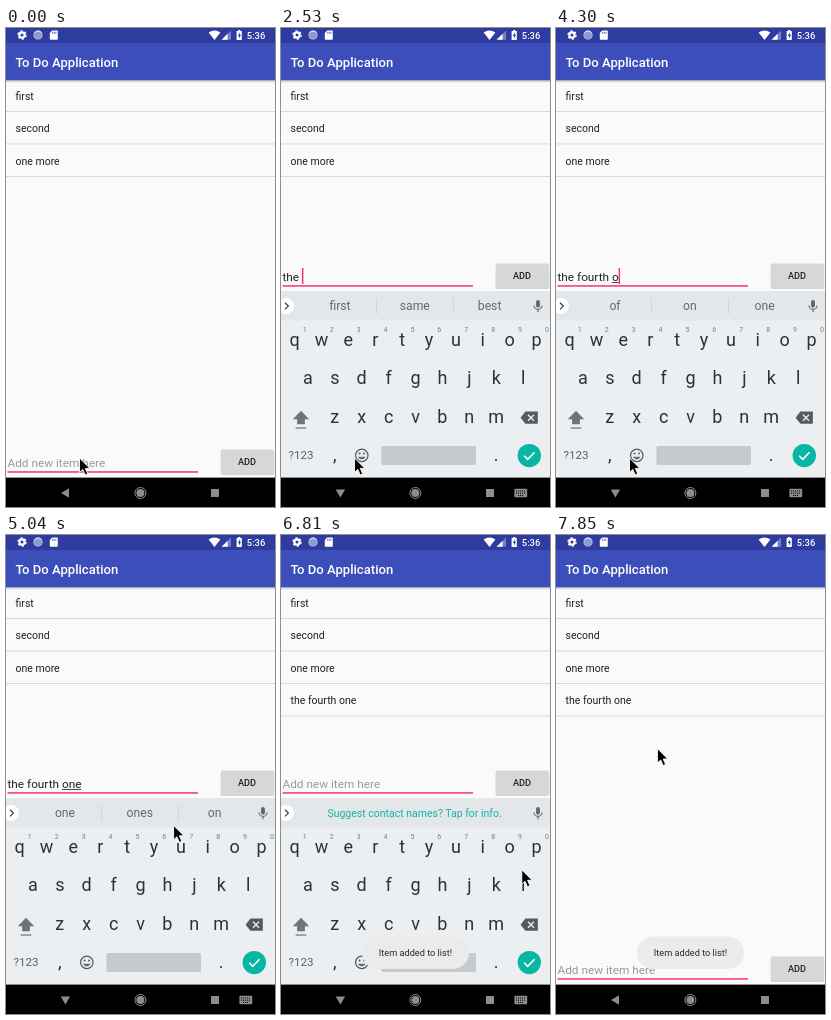
An HTML page for the animation above (8 s loop, 269 px wide and 479 px high).

```html
<!DOCTYPE html>
<html lang="en">
<head>
<meta charset="utf-8">
<title>To Do Application</title>
<style>
html, body { margin: 0; width: 100%; height: 100%; overflow: hidden; background: #fafafa; }
svg { display: block; width: 100vw; height: 100vh; font-family: Roboto, sans-serif; }
text { white-space: pre; }
.mid { text-anchor: middle; }
.med { font-weight: 500; }
</style>
</head>
<body>
<svg viewBox="0 0 269 479">
  <defs>
    <linearGradient id="shade" x1="0" y1="0" x2="0" y2="1">
      <stop offset="0" stop-color="#000" stop-opacity=".26"/>
      <stop offset="1" stop-color="#000" stop-opacity="0"/>
    </linearGradient>
  </defs>
  <rect width="269" height="479" fill="#fafafa"/>
  <g id="list" font-size="10.5" fill="#212121"></g>

  <rect y="52" width="269" height="3" fill="url(#shade)"/>
  <rect width="269" height="52.2" fill="#3c4eba"/>
  <rect width="269" height="15" fill="#2e3b9f"/>
  <text class="med" x="9.4" y="38.6" font-size="13.1" fill="#fff">To Do Application</text>

  <g id="status" fill="#fff">
    <circle cx="16" cy="7" r="2.6" fill="none" stroke="#fff" stroke-width="2.2"/>
    <circle cx="16" cy="7" r="4.1" fill="none" stroke="#fff" stroke-width="1.3" stroke-dasharray="2.15"/>
    <circle cx="32" cy="7" r="4.1" fill="#8e97d2" stroke="#b9bfe4" stroke-width=".9"/>
    <path d="M29 4.6a4.2 4.2 0 0 1 6.6 .2" fill="none" stroke="#e8eaf6"/>
    <path d="M46.2 2.4h4.9q.7 0 .7.7v8q0 .7-.7.7h-6.6q-.7 0-.7-.7V4.9z"/>
    <path d="M46.7 3.8v2M48.3 3.8v2M49.9 3.8v2" stroke="#2e3b9f" stroke-width=".7"/>
    <path d="M202.6 4.5q5.9-4.2 11.8 0l-5.9 7.4z"/>
    <path d="M225 2.4v9.4h-9.4z" opacity=".35"/>
    <path d="M221.6 5.8v6h-6z"/>
    <path d="M230.6 3.1h1.5v-1h2.2v1h1.5v8.8h-5.2z"/>
    <path d="M233.8 4.2l-2 3.7h1.2v2.7l2-3.8h-1.2z" fill="#2e3b9f"/>
    <text class="med" x="240.8" y="10.6" font-size="9.4">5:36</text>
  </g>

  <g id="bar">
    <text id="entry" x="1.5" y="438.6" font-size="11.8"></text>
    <rect id="under" y="440" height=".8" fill="#212121"/>
    <rect x="1.5" y="443.2" width="190.5" height="1.5" fill="#f5307f"/>
    <rect id="caret" y="426" width="1.5" height="16" fill="#f5307f"/>
    <rect x="214.6" y="422.4" width="53.6" height="24.6" rx="1.8" fill="#000" opacity=".16"/>
    <rect x="215" y="421.6" width="52.8" height="24.2" rx="1.4" fill="#d6d7d7"/>
    <rect id="press" x="215" y="421.6" width="52.8" height="24.2" rx="1.4" fill="#000"/>
    <text class="mid med" x="241" y="437.2" font-size="9.2" fill="#212121">ADD</text>
  </g>

  <g id="board">
    <rect y="263" width="269" height="190" fill="#eceff1"/>
    <rect y="263" width="269" height="29.5" fill="#e3e7ea"/>
    <circle cx="5" cy="278" r="8" fill="#fff"/>
    <path d="M4 274.8l3.3 3.3-3.3 3.3" fill="none" stroke="#37474f" stroke-width="1.3"/>
    <g id="words" class="mid" font-size="12.2" fill="#5f6b70">
      <path d="M95.5 270v16M172.5 270v16" stroke="#cbd0d3" stroke-width=".8"/>
      <text x="59" y="282.4"></text><text x="133.8" y="282.4"></text><text x="208.6" y="282.4"></text>
    </g>
    <text id="offer" class="mid" x="133.6" y="282" font-size="10.5" fill="#12b5a2">Suggest contact names? Tap for info.</text>
    <rect x="255.1" y="272" width="3.8" height="7.6" rx="1.9" fill="#5a666c"/>
    <path d="M253 277.4a4 4 0 0 0 8 0M257 281.4v2.8" fill="none" stroke="#5a666c" stroke-width="1.1"/>
    <g id="keys" class="mid" font-size="18" fill="#27343a"></g>
    <g fill="#69767c">
      <path d="M20 382.8l8.2 8.4h-4.3v5h-7.8v-5h-4.3z"/>
      <rect x="14.6" y="399.4" width="10.8" height="1.2"/>
    </g>
    <path d="M239.6 389.7l4.8-6.1h12.4v12.2h-12.4z" fill="#4f5c62"/>
    <path d="M247 386.7l6 6M253 386.7l-6 6" stroke="#eceff1" stroke-width="1.4"/>
    <text class="mid" x="20" y="431.4" font-size="11.6" fill="#566369">?123</text>
    <g fill="none" stroke="#4f5c62" stroke-width="1.2">
      <circle cx="80.8" cy="427.4" r="6.2"/>
      <path d="M77.4 429.2q3.4 3.6 6.8 0z" fill="#4f5c62" stroke-width=".6"/>
    </g>
    <circle cx="78.6" cy="425.6" r="1" fill="#4f5c62"/>
    <circle cx="83" cy="425.6" r="1" fill="#4f5c62"/>
    <rect x="100.4" y="418" width="94.6" height="19" rx="1.4" fill="#c5cacd"/>
    <circle cx="248.3" cy="427.6" r="11.7" fill="#08b7a3"/>
    <path d="M243.2 427.8l3.5 3.5 6.9-7" fill="none" stroke="#fff" stroke-width="1.6"/>
  </g>

  <rect y="449.6" width="269" height="30" fill="#000"/>
  <g fill="#8d8d8d">
    <path id="back" d="M55 465l8-4.7v9.4z"/>
    <circle cx="134.4" cy="465" r="5.5" fill="none" stroke="#8d8d8d" stroke-width="1"/>
    <circle cx="134.4" cy="465" r="4"/>
    <rect x="205" y="461" width="8" height="8"/>
    <g id="ime">
      <rect x="233.4" y="460.8" width="12.8" height="8.4" rx="1"/>
      <path d="M235 463h10M235 465.2h10M237 467.5h6" stroke="#000" stroke-width="1" stroke-dasharray="1.1 .9"/>
    </g>
  </g>

  <g id="toast">
    <rect x="81" y="401.6" width="107" height="32.4" rx="16.2" fill="#ebebeb"/>
    <text class="mid" x="134.5" y="421" font-size="9.2" fill="#2a2a2a">Item added to list!</text>
  </g>

  <path id="mouse" d="M0 0V14.4L3.3 11.4L5.7 16.9L8.2 15.8L5.8 10.4H10.4Z" fill="#000" stroke="#fff" stroke-width=".9"/>
</svg>
<script>
const LOOP = 8000;
const $ = id => document.getElementById(id);
const set = (el, attrs) => { for (const k in attrs) el.setAttribute(k, attrs[k]); };
const show = (el, on) => el.setAttribute('visibility', on ? 'visible' : 'hidden');

function add(parent, tag, attrs, label) {
  const el = document.createElementNS('http://www.w3.org/2000/svg', tag);
  set(el, attrs);
  if (label) el.textContent = label;
  parent.appendChild(el);
  return el;
}

// List rows and their dividers
const rows = ['first', 'second', 'one more', 'the fourth one'].map((label, i) => {
  const g = add($('list'), 'g', {});
  add(g, 'text', { x: 9.5, y: 71.7 + i * 32.4 }, label);
  add(g, 'rect', { y: 83 + i * 32.5, width: 269, height: .9, fill: '#d5d5d5' });
  return g;
});

// Letter keys
const PITCH = 26.9;
[['qwertyuiop', 13.5, 317.6], ['asdfghjkl', 26.9, 356], ['zxcvbnm', 53.8, 395]].forEach(([letters, x0, y], r) => {
  [...letters].forEach((c, i) => {
    const x = x0 + i * PITCH;
    add($('keys'), 'text', { x, y }, c);
    if (!r) add($('keys'), 'text', { x: x + 10.3, y: 303.8, 'font-size': 7, fill: '#718087' }, String((i + 1) % 10));
  });
});
add($('keys'), 'text', { x: 53.8, y: 433.4 }, ',');
add($('keys'), 'text', { x: 215, y: 433.4 }, '.');

const span = (a, b, n) => Array.from({ length: n }, (_, i) => Math.round((a + (b - a) * i / (n - 1)) / 10) * 10);
const ticks = [0, 300, 750, 1190, 1790, ...span(2240, 2530, 3), ...span(3120, 3420, 3),
  ...span(3860, 4590, 6), ...span(5040, 5780, 6), ...span(6070, 7100, 8), ...span(7250, 7850, 5)];
const last = (list, t) => list.filter(e => e[0] <= t).pop();

// Time, typed text, suggestions
const typing = [
  [0, '', ''],
  [2390, 'th', 'the this that'],
  [2530, 'the ', 'first same best'],
  [3120, 'the f', 'first for full'],
  [3270, 'the fo', 'for food four'],
  [3420, 'the four', 'four for fourth'],
  [3860, 'the fourt', 'fourth fort four'],
  [4000, 'the fourth', 'fourth forth four'],
  [4150, 'the fourth ', 'of one and'],
  [4290, 'the fourth o', 'of on one'],
  [4440, 'the fourth on', 'on one only'],
  [4590, 'the fourth one', 'one ones on'],
  [6200, '', 'one ones on']
];

const caretTimes = [[0, 0], [300, 1], [750, 0], [1190, 1], [1790, 0], [2240, 1],
  [5040, 0], [5480, 1], [6810, 0], [7250, 1], [7850, 0]];

const pen = document.createElement('canvas').getContext('2d');
pen.font = '11.8px Roboto, sans-serif';
const wide = s => pen.measureText(s).width;

const clamp = v => Math.max(0, Math.min(1, v));
const prog = (t, a, b) => clamp((t - a) / (b - a));
const smooth = u => u * u * (3 - 2 * u);
const easeOut = u => 1 - (1 - u) ** 2;

// Pointer path: start, end, from, control, to, easing
const REST = [73.5, 430], MID = [167.6, 290.4], BTN = [233.6, 242], DONE = [243, 428], OFF = [240.6, 414.6], END = [101.4, 213.6];
const half = (a, b) => [(a[0] + b[0]) / 2, (a[1] + b[1]) / 2];
const moves = [
  [0, 5040, REST, REST, REST, smooth],
  [5040, 5780, MID, [205, 167], BTN, easeOut],
  [6510, 7100, BTN, [243, 330], DONE, smooth],
  [7250, 7400, DONE, half(DONE, OFF), OFF, smooth],
  [7400, 7850, OFF, half(OFF, END), END, smooth]
];

function pointer(t) {
  const [a, b, p, c, q, ease] = last(moves, t);
  const u = ease(prog(t, a, b)), v = 1 - u;
  return [0, 1].map(i => v * v * p[i] + 2 * u * v * c[i] + u * u * q[i]);
}

function draw(now) {
  const clock = now % LOOP;
  const t = ticks.filter(k => k <= clock).pop();
  const [, typed, hints] = last(typing, t);
  const open = t >= 2390 && t < 7550;

  show(rows[3], t >= 6200);
  set($('bar'), { transform: `translate(0 ${open ? -186 : 0})` });

  // Text field
  $('entry').textContent = typed || 'Add new item here';
  set($('entry'), { fill: typed ? '#212121' : '#9a9a9a' });
  const cut = typed.lastIndexOf(' ') + 1;
  set($('under'), { x: 1.5 + wide(typed.slice(0, cut)), width: wide(typed.slice(cut)) });
  set($('caret'), { x: 1.4 + wide(typed) });
  show($('caret'), last(caretTimes, t)[1]);
  set($('press'), { opacity: .13 * prog(t, 5920, 6220) * (1 - prog(t, 6220, 6510)) });

  // Keyboard
  show($('board'), t >= 2240 && t < 7550);
  const entering = t < 2390;
  set($('board'), {
    transform: `translate(0 ${entering ? 8 : t >= 7400 ? 1 : 0})`,
    opacity: entering ? .75 : 1
  });
  const offer = t >= 6370;
  set($('words'), { display: offer ? 'none' : 'inline' });
  set($('offer'), { display: offer ? 'inline' : 'none' });
  const parts = hints.split(' ');
  $('words').querySelectorAll('text').forEach((el, i) => { el.textContent = parts[i] || ''; });

  // Navigation bar
  const imeNav = t >= 2240 && t < 7400;
  set($('back'), { transform: imeNav ? 'rotate(-90 59.4 465)' : '' });
  show($('ime'), imeNav);

  set($('toast'), { opacity: prog(t, 6220, 6510) });
  set($('mouse'), { transform: `translate(${pointer(t).join(' ')})` });
}

const start = performance.now();
function loop() {
  draw(performance.now() - start);
  requestAnimationFrame(loop);
}
loop();
</script>
</body>
</html>
```
